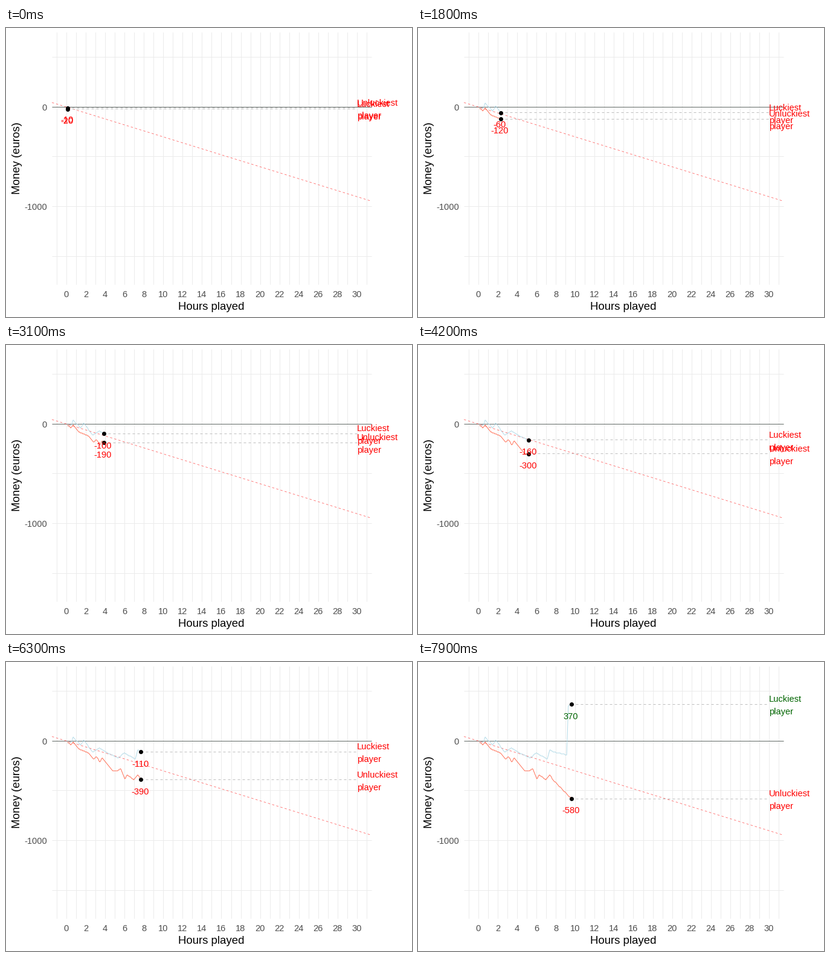
Recreate the animation shown at these times as a matplotlib script. Size 672 by 480 pixels, loop 8000 ms.

```python
import matplotlib.pyplot as plt
import numpy as np
from matplotlib.animation import FuncAnimation

W, H, DPI = 672, 480, 100
FRAMES, INTERVAL = 80, 100
PX = 72 / DPI                       # one pixel in points
STEPS_PER_HOUR = 12
STEPS_PER_FRAME = 359 / 249         # thirty hours revealed over 250 frames
LEFT, RIGHT, TOP, BOTTOM = 76, 605, 7, 426

plt.rcParams["font.family"] = "Liberation Sans"

# turning points: (five-minute step, balance in bets of ten euros)
LUCKY = [(1, -2), (6, -1), (8, 4), (17, -4), (21, 1), (32, -11), (41, -7),
         (50, -12), (64, -17), (71, -12), (85, -18), (88, -9), (93, -11),
         (109, -14), (111, 35), (115, 37)]
UNLUCKY = [(1, -1), (5, -4), (8, -1), (15, -8), (27, -12), (33, -18),
           (37, -16), (41, -21), (44, -17), (57, -30), (62, -30), (67, -28),
           (72, -38), (75, -34), (83, -39), (88, -34), (92, -39), (115, -58)]


def px(hours):
    return 100 + 16.03 * hours


def py(euros):
    return 130.7 - 0.1655 * euros


fig = plt.figure(figsize=(W / DPI, H / DPI), dpi=DPI, facecolor="white")
ax = fig.add_axes([0, 0, 1, 1])
ax.set(xlim=(0, W), ylim=(H, 0))
ax.axis("off")


def line(x, y, color, z, dashed=False, width=1):
    style = (0, (4, 4)) if dashed else "-"
    return ax.plot(x, y, color=color, lw=width * PX, ls=style, zorder=z,
                   solid_capstyle="butt", dash_capstyle="butt")[0]


def label(x, y, text, color, ha="center", size=14.67, **kw):
    return ax.text(x, y, text, color=color, ha=ha, va="baseline",
                   fontsize=size * PX, zorder=6, **kw)


def draw_background():
    for hour in range(-1, 32):
        line([px(hour)] * 2, [TOP, BOTTOM], "#ebebeb", 0)
    for euros in range(-1500, 501, 500):
        line([LEFT, RIGHT], [py(euros)] * 2, "#ebebeb", 0)
    line([LEFT, RIGHT], [py(0)] * 2, "#626a66", 2)
    line([LEFT, RIGHT], [py(45) + 0.5, py(-945) + 0.5], "#ff7070", 2,
         dashed=True, width=0.9)

    for hour in range(0, 31, 2):
        label(px(hour) - 0.2, 446.8, str(hour), "#4d4d4d")
    for euros in (0, -1000):
        label(68, py(euros) + 6.1, str(euros), "#4d4d4d", "right")
    label(339.3, 468.5, "Hours played", "black", size=18.67)
    label(23.2, 215.7, "Money (euros)", "black", size=18.67,
          rotation=90, rotation_mode="anchor")


class Player:
    def __init__(self, turns, name, color):
        turn_steps, bets = np.array(turns).T
        self.steps = np.arange(1, turn_steps[-1] + 1)
        self.euros = 10 * np.round(np.interp(self.steps, turn_steps, bets))
        self.path = line([], [], color, 3, width=0.9)
        self.guide = line([], [], "#bebebe", 4, dashed=True)
        self.dot, = ax.plot([], [], "o", color="black", ms=7 * PX, mew=0,
                            zorder=5)
        self.value = label(0, 0, "", "red")
        self.names = [label(px(30), 0, text, "red", "left")
                      for text in (name, "player")]

    def balance(self, step):
        return np.interp(step, self.steps, self.euros)

    def update(self, step):
        seen = self.steps < step
        steps = np.append(self.steps[seen], step)
        euros = np.append(self.euros[seen], self.balance(step))
        self.path.set_data(px(steps / STEPS_PER_HOUR) + 0.5, py(euros) + 0.5)

        x, y = px(step / STEPS_PER_HOUR), py(euros[-1])
        self.guide.set_data([x, px(30)], [y, y])
        self.dot.set_data([x + 0.5], [y + 0.5])

        shown = int(self.balance(np.ceil(step)))
        self.value.set_text(str(shown))
        self.value.set_position((x - 0.6, y + 24.9))
        for text, dy in zip(self.names, (-3.4, 17.7)):
            text.set_y(y + dy)
        for text in (self.value, *self.names):
            text.set_color("darkgreen" if shown > 0 else "red")


draw_background()
players = [Player(LUCKY, "Luckiest", "lightblue"),
           Player(UNLUCKY, "Unluckiest", "tomato")]


def update(frame):
    for player in players:
        player.update(1 + frame * STEPS_PER_FRAME)
    return []


anim = FuncAnimation(fig, update, frames=FRAMES, interval=INTERVAL,
                     init_func=lambda: update(0), repeat=True, repeat_delay=0)
plt.show()
```
